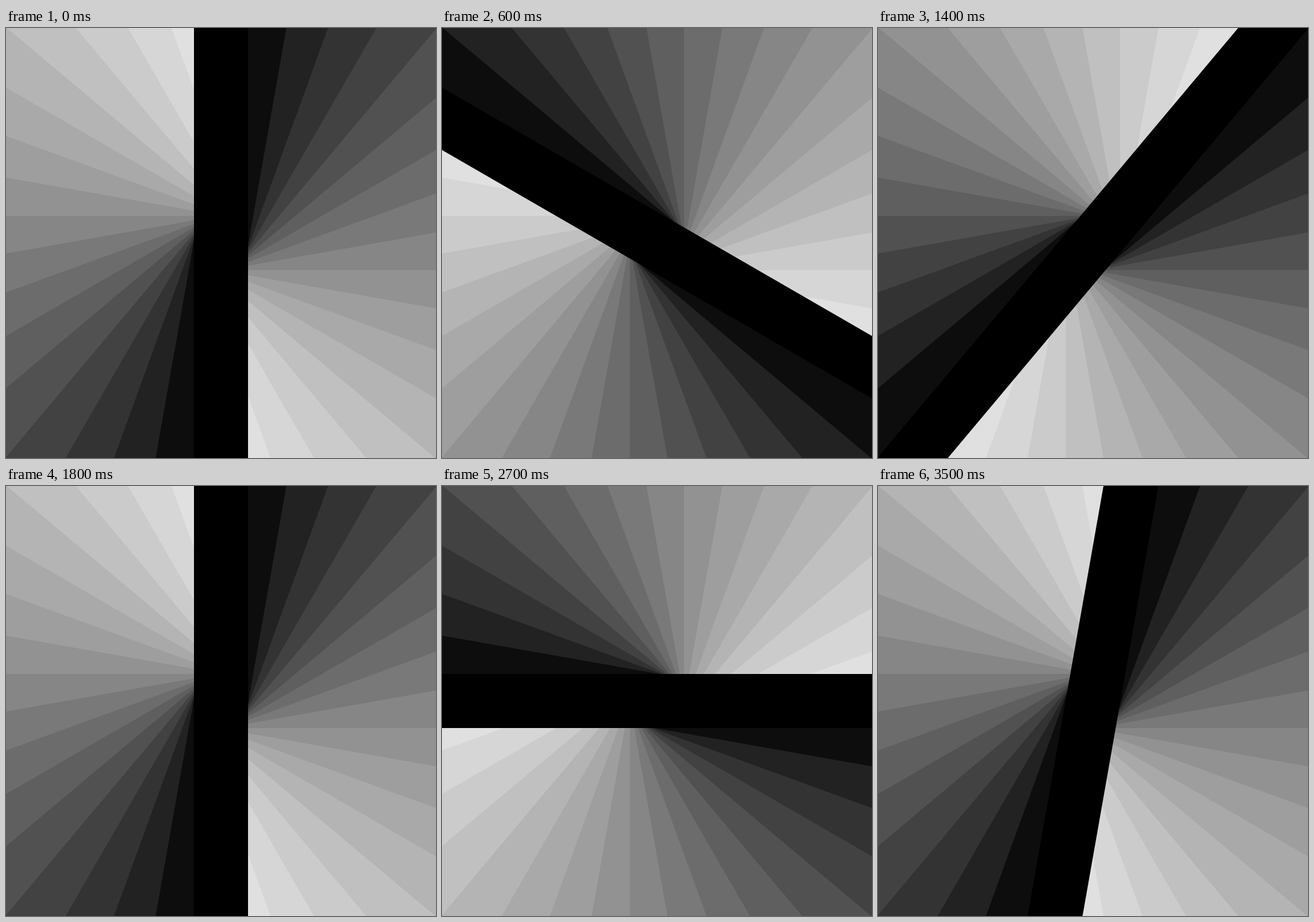
Recreate the animation shown at these times as an HTML page with a canvas. Size 748 by 748 pixels, loop 3600 ms.

```html
<!DOCTYPE html>
<html lang="en">
<head>
<meta charset="utf-8">
<title>Turning bar</title>
<style>
  html, body { margin: 0; width: 100%; height: 100%; overflow: hidden; background: #000; }
  canvas { display: block; width: 748px; height: 748px; }
</style>
</head>
<body>
<canvas id="stage" width="748" height="748"></canvas>
<script>
const SIZE = 748, MID = SIZE / 2, BAR = 94, REACH = 600;
const STEP_MS = 100, STEPS = 36, TURN = Math.PI / 18;

// Grey of the bar by age, newest first
const GREYS = [0, 13, 34, 51, 66, 81, 95, 108, 121, 134, 146, 158, 169, 180, 192, 203, 214, 224];

const ctx = document.getElementById('stage').getContext('2d');

function drawBar(step, grey) {
  // The bar looks the same after half a turn
  const half = STEPS / 2;
  const turn = ((step % half) + half) % half;
  ctx.setTransform(1, 0, 0, 1, MID, MID);
  if (turn === half / 2) ctx.transform(0, 1, -1, 0, 0, 0);
  else ctx.rotate(-turn * TURN);
  ctx.fillStyle = `rgb(${grey},${grey},${grey})`;
  ctx.fillRect(-BAR / 2, -REACH, BAR, REACH * 2);
}

function draw(step) {
  for (let age = GREYS.length - 1; age >= 0; age--) drawBar(step - age, GREYS[age]);
}

const start = performance.now();
let shown = -1;

function tick() {
  const step = Math.floor((performance.now() - start) / STEP_MS) % STEPS;
  if (step !== shown) {
    draw(step);
    shown = step;
  }
  requestAnimationFrame(tick);
}
tick();
</script>
</body>
</html>
```
